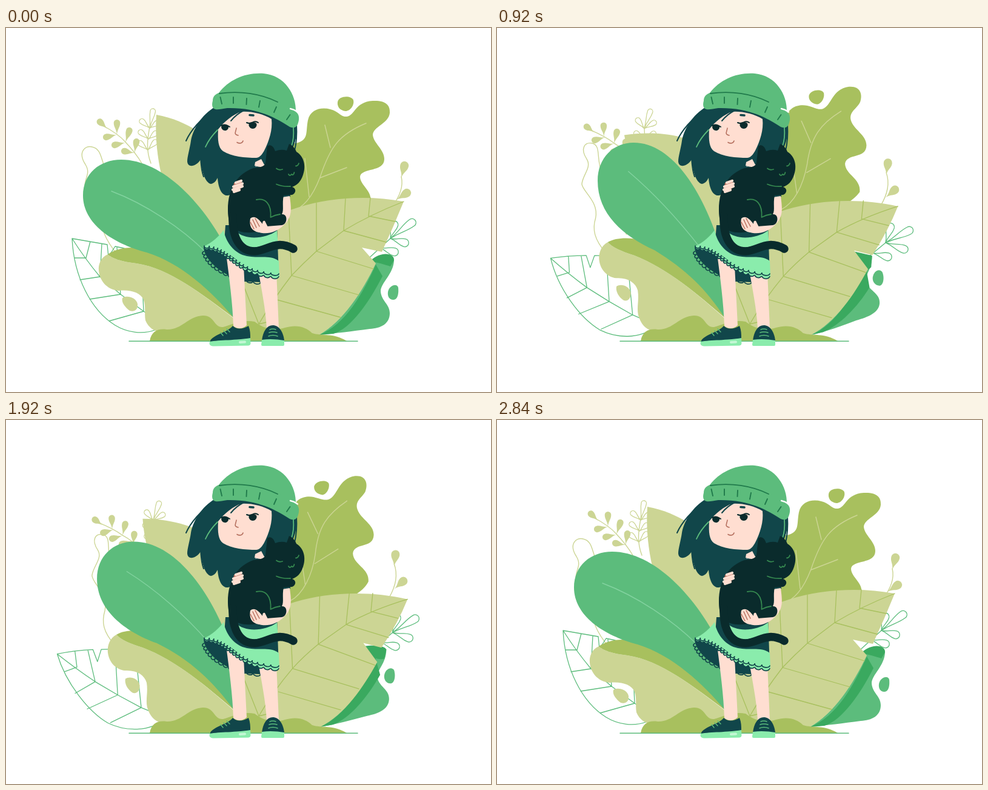
An HTML page with a canvas that plays this animation: 800 px wide and 600 px high, repeating every 2880 ms.

```html
<!DOCTYPE html>
<html lang="en">
<head>
<meta charset="utf-8">
<title>Girl with a cat among leaves</title>
<style>
html, body { margin: 0; width: 100%; height: 100%; overflow: hidden; background: #fff; }
canvas { display: block; width: 800px; height: 600px; }
</style>
</head>
<body>
<canvas id="stage" width="800" height="600"></canvas>
<script>
const ctx = document.getElementById('stage').getContext('2d');
const LOOP = 2880, STEP = 40, END = 2840;
const GREEN = '#5cbc7c', DEEP = '#3aa95f', PALE = '#ccd594', OLIVE = '#a8c05e',
  MINT = '#8aecac', TEAL = '#11464a', CAT = '#0a2b2c', SKIN = '#ffded1',
  BROWN = '#b5705f', SEAM = '#207a4b', FUR = '#35884f';
ctx.lineCap = ctx.lineJoin = 'round';

// Sway from 0 to 1 and back, with its turning point at `peak`.
function sway(t, peak) {
  const u = t < peak ? t / peak : Math.max(0, (END - t) / (END - peak));
  return (1 - Math.cos(Math.PI * u)) / 2;
}

const lerp = (a, b, p) => a + (b - a) * p;

// Both paths must use the same commands.
function blend(a, b, p) {
  const to = b.match(/-?[\d.]+/g);
  let i = 0;
  return a.replace(/-?[\d.]+/g, n => lerp(+n, +to[i++], p).toFixed(2));
}

function fill(d, color) {
  ctx.fillStyle = color;
  ctx.fill(new Path2D(d));
}

function line(d, color, width = 1.3) {
  ctx.strokeStyle = color;
  ctx.lineWidth = width;
  ctx.stroke(new Path2D(d));
}

// A teardrop from its pointed base to its round end.
function drop([x, y, tx, ty], w, color, filled) {
  const len = Math.hypot(tx - x, ty - y), c = len - w;
  ctx.save();
  ctx.translate(x, y);
  ctx.rotate(Math.atan2(ty - y, tx - x));
  const d = `M0 0C${c * .5} ${-w * .15} ${c * .6} ${-w} ${c} ${-w}` +
    `A${w} ${w} 0 0 1 ${c} ${w}C${c * .6} ${w} ${c * .5} ${w * .15} 0 0Z`;
  filled ? fill(d, color) : line(d, color);
  ctx.restore();
}

function drops(a, b, p, w, color, filled) {
  a.forEach((from, i) => drop(from.map((n, k) => lerp(n, b[i][k], p)), w, color, filled));
}

// Small scallops along a cubic curve.
function lace(pts, count, r, inside) {
  const at = (k, u) => {
    const v = 1 - u;
    return v * v * v * pts[k] + 3 * v * v * u * pts[k + 2] + 3 * v * u * u * pts[k + 4] + u * u * u * pts[k + 6];
  };
  ctx.strokeStyle = TEAL;
  ctx.fillStyle = inside;
  ctx.lineWidth = 1.7;
  for (let i = 0; i < count; i++) {
    const u = i / count, v = (i + 1) / count;
    const x = at(0, u), y = at(1, u), dx = at(0, v) - x, dy = at(1, v) - y;
    ctx.beginPath();
    ctx.ellipse(x + dx / 2, y + dy / 2, Math.hypot(dx, dy) / 2, r, Math.atan2(dy, dx), 0, Math.PI);
    ctx.fill();
    ctx.stroke();
  }
}

function rightPlants(t) {
  const slow = sway(t, 1520), fast = sway(t, 1110), twig = sway(t, 1000);

  // Lobed olive leaf
  fill(blend('M440 345L440 190L478 190C500 185 494 172 498 152C502 134 520 130 535 134C550 138 552 147 562 146C576 144 575 122 605 120C625 119 634 126 633 140C631 158 606 162 605 176C606 190 624 200 624 216C624 238 586 230 584 245C584 260 606 268 601 290C570 310 520 330 440 345Z',
    'M440 345L440 190L445 180C470 170 460 160 465 148C470 128 485 123 500 125C512 128 517 129 524 127C540 121 540 90 568 85C585 83 588 99 582 112C575 121 567 125 573 140C580 157 602 164 602 182C601 206 572 193 569 213C570 233 598 238 597 260C595 275 585 282 575 292C550 310 520 330 440 345Z', slow), OLIVE);
  fill(blend('M547 122C549 111 570 111 573 119C575 128 567 137 560 137C551 136 546 130 547 122Z',
    'M498 106C501 96 520 94 522 102C523 110 518 119 512 120C503 119 497 113 498 106Z', slow), OLIVE);
  line(blend('M594 157C550 175 535 195 518 246C505 280 490 296 470 304M526 160L535 197M562 230L518 247M493 215L500 278',
    'M554 127C525 150 509 170 508 215C505 250 490 285 468 297M490 150L509 185M544 208L507 234M486 235L492 270', slow), PALE, 1.4);

  // Small drop plant
  line(blend('M652 245C656 262 648 280 636 295', 'M637 235C645 255 640 275 631 292', slow), PALE, 1.4);
  drops([[652, 247, 659, 220], [644, 283, 667, 268]],
    [[637, 240, 639, 213], [640, 277, 659, 259]], slow, 7, PALE, true);

  // Outlined twig
  line(blend('M600 378L634 347', 'M600 388L641 354', twig), GREEN);
  drops([[634, 347, 675, 317], [634, 347, 664, 356], [616, 362, 647, 371], [634, 347, 642, 318]],
    [[641, 354, 686, 331], [641, 354, 678, 367], [620, 371, 651, 379], [641, 354, 651, 322]], twig, 6.5, GREEN);

  // Folded green leaf
  fill(blend('M516 506C560 480 590 430 602 383C618 370 640 370 640 382C640 405 618 420 618 434C619 450 633 455 633 470C633 488 618 495 600 496C570 500 545 503 516 506Z',
    'M518 506C560 480 590 430 582 366C602 373 610 374 617 375C617 398 606 405 608 416C612 432 632 435 631 452C630 468 612 475 592 481C570 490 545 500 518 506Z', fast), GREEN);
  fill(blend('M516 506C560 490 590 435 610 390L621 409C600 450 570 495 540 504Z',
    'M518 506C560 490 590 435 608 392L614 429C595 460 565 490 538 501Z', fast), DEEP);
  fill(blend('M602 383C618 368 640 370 640 383L634 393C625 390 612 386 602 385Z',
    'M580 365C600 372 612 374 617 375L616 394C612 400 610 400 604 395Z', fast), DEEP);
  fill(blend('M630 435C632 424 645 420 647 428C648 438 646 448 639 448C632 448 629 442 630 435Z',
    'M619 409C621 398 630 394 635 401C639 411 636 423 630 423C623 423 618 416 619 409Z', fast), GREEN);

  // Large pale leaf
  fill(blend('M656 286Q639 328 620 369L587 362L610 388C588 435 555 485 516 506L415 498L376 498L376 340L400 340C452 291 560 268 656 286Z',
    'M664 298Q648 338 619 377L590 369L613 402C590 442 560 486 519 506L415 498L376 498L376 340L400 340C455 292 565 274 664 298Z', slow), PALE);
  line(blend('M417 488Q440 448 471 408Q490 388 512 368L557 334Q600 308 656 286M471 408L466 302M512 368L512 288M557 334L560 281M598 310L601 280M447 448L552 477M471 408L582 440M512 368L606 397M557 334L627 353M598 310L642 319M390 420L417 488L434 484',
    'M417 488Q440 448 473 410Q492 389 516 370L562 338Q606 314 664 298M473 410L468 305M516 370L519 290M562 338L568 286M603 317L606 287M450 448L552 478M473 410L582 444M516 370L609 406M562 338L632 360M603 317L648 329M390 420L417 488L434 484', slow), OLIVE);
}

function leftPlants(t) {
  const slow = sway(t, 1520), mid = sway(t, 1400), fast = sway(t, 1110);

  line(blend('M185 375C160 345 155 325 160 310C165 290 135 270 130 262C130 245 140 240 131 225C118 205 130 193 142 196C160 200 155 220 170 245C180 275 195 300 210 340',
    'M178 370C160 350 158 335 164 315C170 285 145 270 145 255C147 240 165 225 157 212C146 195 152 185 165 187C180 192 165 215 178 245C185 275 200 300 215 340', slow), PALE, 1.4);

  // Twig with drops
  line(blend('M160 161Q186 175 197 188Q214 206 224 223', 'M152 172Q176 181 190 190Q210 198 222 213', slow), PALE, 1.4);
  drops([[167, 166, 151, 151], [183, 176, 183, 151], [183, 176, 160, 181], [197, 189, 205, 164], [197, 189, 174, 194], [212, 206, 216, 182], [212, 206, 190, 202]],
    [[157, 175, 140, 164], [173, 181, 172, 158], [176, 182, 154, 189], [191, 191, 196, 167], [191, 191, 169, 198], [209, 205, 211, 183], [208, 198, 185, 207]], slow, 5.3, PALE, true);

  // Outlined twig
  line(blend('M239 223C230 200 234 180 237 163', 'M262 222C250 204 247 182 245 164', mid), PALE, 1.4);
  drops([[237, 165, 243, 133], [237, 165, 221, 151], [237, 165, 253, 154], [235, 183, 219, 169], [235, 183, 250, 171], [234, 201, 218, 187], [234, 201, 249, 185]],
    [[245, 166, 258, 134], [245, 166, 233, 148], [245, 166, 266, 154], [247, 184, 229, 172], [247, 184, 266, 172], [250, 202, 233, 190], [250, 202, 266, 189]], mid, 4.3, PALE);

  // Pale pointed leaf
  fill(blend('M248 143C300 152 340 185 352 200L400 300L376 478C300 380 240 260 248 143Z',
    'M207 179C250 171 310 172 345 200L400 300L376 478C300 380 225 260 207 179Z', fast), PALE);

  // Outlined leaf
  line(blend('M109 347Q138 352 167 357L169 377L180 360Q205 364 232 378M109 347C112 410 140 465 180 490C200 502 225 506 248 497M109 347Q130 380 155 410L189 439L227 467L250 482M132 379L139 352M155 410L158 356M189 439L183 362M227 467L224 400M132 379L113 379M155 410L122 415M189 439L138 447M227 467L170 483',
    'M78 396Q106 387 137 384L146 404L151 383Q190 380 222 386M78 396C95 440 135 485 165 502C195 516 240 518 268 490M78 396Q110 417 145 437L183 457L222 476L265 492M113 415L107 389M145 437L129 386M183 457L179 382M222 476L213 398M113 415L93 424M145 437L112 460M183 457L133 484M222 476L173 503', slow), GREEN);

  // Wavy leaf with a folded edge
  fill(blend('M375 478C325 440 270 396 215 388C190 385 175 380 168 373C156 378 152 390 153 400C155 420 170 432 186 433C205 431 222 436 227 448C231 460 228 470 230 482C235 494 245 500 254 501L375 501Z',
    'M375 478C335 440 285 396 230 370C210 362 195 355 188 346C177 352 173 365 174 376C176 393 188 403 200 405C220 404 231 414 234 427C236 445 231 455 234 470C238 486 246 496 256 497L375 501Z', mid), PALE);
  fill(blend('M168 373C180 364 205 358 232 365C290 378 345 420 376 478C325 440 270 396 215 388C190 385 175 380 168 373Z',
    'M188 346C202 338 225 340 245 345C300 370 350 430 376 478C335 440 285 396 230 370C210 362 195 355 188 346Z', mid), OLIVE);
  fill(blend('M192 445C198 440 215 444 217 455C218 466 210 468 204 466C196 460 190 452 192 445Z',
    'M199 419C206 414 220 418 222 430C222 440 217 445 211 443C202 438 197 427 199 419Z', mid), PALE);

  // Round green leaf
  fill(blend('M376 478C340 435 290 388 232 370C175 355 127 322 127 276C127 240 155 217 190 217C258 217 330 290 372 380Z',
    'M376 478C345 430 315 400 262 366C210 342 169 305 169 250C169 212 195 187 228 187C292 187 345 270 374 380Z', fast), GREEN);
  line(blend('M174 269C230 290 290 330 330 370', 'M220 234C260 270 300 315 336 362', fast), '#83d3a0', 1.4);
}

function ground() {
  fill('M237 516C240 500 250 495 265 497C290 498 300 475 325 474C345 474 342 494 358 493C375 488 390 480 410 484C425 495 440 500 460 494C480 488 495 493 505 503C520 508 540 502 562 516Z', OLIVE);
  line('M203 516.3L580 516.3', GREEN, 1.5);
}

function legs() {
  fill('M326 362C328 385 360 410 395 418L420 419L420 400L365 372Z', TEAL);
  lace([327, 368, 332, 392, 365, 412, 420, 419], 13, 4, 'transparent');
  fill('M363 372L392 392L397 490C390 497 380 496 375 491C374 455 368 410 363 372Z', SKIN);
  fill('M416 398L446 402L450 495L430 495C428 460 421 430 416 398Z', SKIN);

  fill('M337 515C345 504 365 502 374 491C381 498 392 496 400 491C403 498 403 505 403 512L337 518Z', TEAL);
  fill('M336 517C352 514 380 515 403 511L403.500 520Q403 523 400 523.500L342 524.500C335 524 335 520 336 517Z', MINT);
  line('M386 518L394 517.500', '#c4f8d5', 4);
  line('M354 502L358 507M359 499L364 504M364 496L369 501', GREEN, 1.5);
  fill('M422 515C424 500 430 490 440 490C450 490 457 500 459 515Z', TEAL);
  fill('M422 514C435 512 447 513 459 515L459 522Q459 524 457 524L423 524Q421 524 421 522Z', MINT);
  line('M435 497Q440 495 445 497M434 502Q440 500 447 502M433 508Q440 505 448 508', GREEN, 1.5);
}

function dress() {
  fill('M362 325L447 325L450 408C420 408 395 395 380 380L360 352Z', TEAL);
  lace([327, 360, 378, 363, 370, 403, 450, 409], 17, 5, MINT);
  fill('M326 360C340 354 352 343 359 333C362 352 375 368 390 374C415 382 434 372 450 384L451 409C420 411 395 398 380 382C365 368 345 367 326 360Z', MINT);
  lace([327, 359, 378, 361, 370, 400, 450, 405], 17, 3.5, MINT);
  fill('M380 335C393 350 428 348 447 334L449 360C430 357 418 362 400 362C388 357 384 347 380 335Z', MINT);
  fill('M385 250C395 232 410 225 432 228L468 262L469 278L455 281L440 320L390 290Z', TEAL);
  fill('M455 279L468 277C471 300 472 312 458 325C445 338 428 341 415 336L440 318Z', SKIN);
}

function head() {
  fill('M345 130C322 143 308 168 305 186C303 200 299 212 299 220C300 231 313 229 321 217C323 235 328 255 338 257C344 256 347 251 349 247C350 262 355 277 366 276C374 275 378 262 382 252L412 228L440 222L472 200C482 180 480 160 478 145L460 125Z', TEAL);
  line('M342 136C322 148 304 170 297 186M321 215C322 230 323 238 326 245M479 158C480 175 479 190 476 202', TEAL, 2);
  line('M349 168C340 177 333 187 329 196M474 164C475 178 474 186 471 194', GREEN, 1.8);
  fill('M411 221L421 216L428 229C420 230 414 228 410 227Z', SKIN);
  fill('M350 167C349 185 350 197 358 203C372 212 395 214 413 214C420 213 423 207 426 202C434 186 440 168 438 150C425 142 405 137 388 138C375 142 360 154 350 167Z', SKIN);
  line('M392 136Q380 142 371 153', TEAL, 2);

  fill('M355.500 161Q362 157 367 162A6 6 0 1 1 355.500 161Z', CAT);
  line('M355 161Q361 157 369 163M397 156Q401 158 407 155.500Q412 153 416 156', CAT, 2);
  fill('M401 157Q407 153.500 413 157A6.500 6.500 0 1 1 401 157Z', CAT);
  line('M402 143.500L408 144', TEAL, 3.6);
  line('M380 165C379 172 375 175 383 177M381 188.500C385 191 390 190 391 186', BROWN, 1.6);

  fill('M341 120C341 112 346 109 351 107C368 85 395 73 425 75C460 78 479 110 478 138C484 142 484 150 482 156C480 164 475 166 468 163C445 148 415 131 365 132C355 133 348 136 343 133C339 130 340 124 341 120Z', GREEN);
  line('M352 108C385 103 420 108 448 122M353.500 114L356 125M375 114L375 124M397 116L396.500 126M419 120L417 130.500M446 130L442 139M468.500 143L463 151', SEAM, 1.9);
  line('M469 133Q475 134 481 138.500', '#fff', 2.3);
}

function cat() {
  fill('M366 300C366 262 383 240 408 231C418 229 426 230 428 222L431 195C436 191 441 194 444 203Q454 199 463 202L467 191C473 193 477 199 479 204C492 212 495 228 490 242C486 254 480 259 472 262C479 264 479 272 472 275L458 276C455 290 459 300 455 307C465 306 465 323 455 325L430 327C425 336 400 340 385 335C370 330 366 318 366 300Z', CAT);
  line('M374 310C373 345 385 368 410 368C432 367 445 348 474 364', CAT, 13.500);
  line('M446 231.500Q450 235 456 233M478 227.500Q482 227 483 223M466 241Q468 245 471 241Q474 244 475.500 238M446 257.500Q457 262 469 261M413 283C428 280 438 290 436.500 312Q444 308 452 307', FUR, 1.8);

  // Hands: brown gaps show between the fingers.
  fill('M374 268L376 255L388 252L391 260L386 266Z', BROWN);
  line('M388 252L379 255M390 256.500L375 261.500M390 261L374 266.500M385 267L376 270', SKIN, 4.2);
  fill('M403 314C401 325 404 335 418 337C432 339 442 334 445 329L432 328L427 318Q423 317 423 323C417 315 410 308 403 314Z', SKIN);
  line('M403 320L409 331M407 316L413 329M411 314L418 327', BROWN, 1.5);
}

function draw(now) {
  const t = Math.floor((now % LOOP) / STEP) * STEP;
  ctx.fillStyle = '#fff';
  ctx.fillRect(0, 0, 800, 600);
  leftPlants(t);
  rightPlants(t);
  ground();
  legs();
  dress();
  head();
  cat();
}

let start;
function tick(now) {
  start ??= now;
  draw(now - start);
  requestAnimationFrame(tick);
}
draw(0);
requestAnimationFrame(tick);
</script>
</body>
</html>
```
